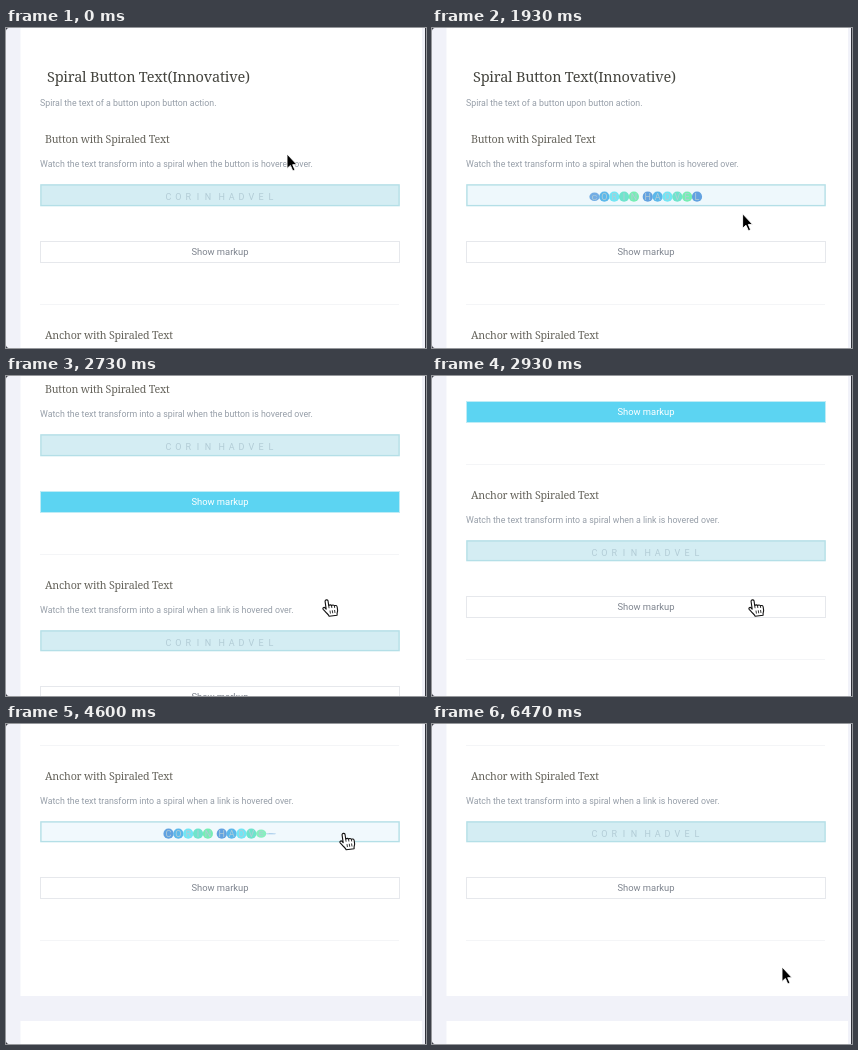
These frames come from a looping animation (420x320 px, 6540 ms). An HTML page:

```html
<!DOCTYPE html>
<html lang="en">
<head>
<meta charset="utf-8">
<title>Spiral button text</title>
<style>
  html, body { margin: 0; width: 100%; height: 100%; overflow: hidden; background: #30323b; }
  svg { display: block; width: 420px; height: 320px; }
  .title, .heading { font-family: "Noto Serif", serif; font-weight: 300; }
  .title { font-size: 14.5px; letter-spacing: -.21px; fill: #45453f; }
  .heading { font-size: 10.7px; letter-spacing: -.21px; fill: #66645c; }
  .note { font: 400 8.8px Roboto, sans-serif; fill: #969ea8; }
  .label { font: 400 9.4px Roboto, sans-serif; text-anchor: middle; }
  .letter { font: 400 9px Roboto, sans-serif; text-anchor: middle; fill: #b2ccd6; }
</style>
</head>
<body>
<svg viewBox="0 0 420 320">
  <rect width="419" height="320" fill="#f1f2f9"/>
  <g id="page">
    <path d="M14.5-10H416V527H14.5ZM14.5 552H416V700H14.5Z" fill="#fff"/>
    <path d="M34 276.5H393M34 471.5H393" stroke="#f4f5f7"/>
    <text class="title" x="41" y="54">Spiral Button Text(Innovative)</text>
    <text class="note" x="34" y="78">Spiral the text of a button upon button action.</text>
    <text class="heading" x="39" y="115">Button with Spiraled Text</text>
    <text class="note" x="34" y="139">Watch the text transform into a spiral when the button is hovered over.</text>
    <text class="heading" x="39" y="311">Anchor with Spiraled Text</text>
    <text class="note" x="34" y="335">Watch the text transform into a spiral when a link is hovered over.</text>
  </g>
  <path d="M0 0H2.5Q.4.4 0 2.5ZM0 320H2.5Q.4 319.6 0 317.5Z" fill="#30323b"/>
  <path id="arrow" d="M0 0V14.5L3.4 11.5L5.8 17L8 16L5.7 10.7H10Z" fill="#000" stroke="#fff" stroke-width=".9"/>
  <g id="hand"><g transform="rotate(-8)" stroke="#111" stroke-width="1.1" stroke-linejoin="round">
    <path fill="#fff" d="M-1.6 9V1.2C-1.6-.6 1.4-.6 1.4 1.2V6C1.8 5 4 5 4.2 6.4C5 5.4 6.8 5.8 7 7C8 6.2 9.6 7 9.6 8.4V11.5C9.6 13 8.4 14 8.4 16.5H.4C.2 14.8-1.6 13.4-3 11L-4.6 8.8C-5.4 7.4-3.4 6.4-2.6 7.6Z"/>
    <path fill="none" stroke-width=".8" d="M1.4 6V8.5M4.2 6.4V8.7M7 7V9M2 11V14M4.3 11V14M6.6 11V14"/>
  </g></g>
</svg>
<script>
const LOOP = 6540, NAME = "CORIN HADVEL", SCROLL = 255;
const PALETTE = ["#62a2e0", "#5cb8ea", "#72e6f4", "#6fe4cc", "#76eeb4"];
const page = document.getElementById("page");

const clamp = v => Math.min(1, Math.max(0, v));
const ramp = (t, start, duration) => clamp((t - start) / duration);
const smooth = u => u * u * (3 - 2 * u);
const mix = (a, b, u) => `rgb(${a.map((v, i) => Math.round(v + (b[i] - v) * u))})`;

function add(parent, tag, attrs, text = "") {
  const node = document.createElementNS("http://www.w3.org/2000/svg", tag);
  for (const key in attrs) node.setAttribute(key, attrs[key]);
  node.textContent = text;
  return parent.appendChild(node);
}

function spiralButton(y, height, enter, leave) {
  const box = add(page, "rect", { x: 34.9, y: y + .9, width: 358.2, height: height - 1.8, stroke: "#b4dfe7", "stroke-width": 1.4 });
  const letters = NAME.split(" ").flatMap((word, w) => [...word].map((char, i) => {
    const index = w * 5 + i;
    const x = 162.5 + 9.85 * index + 4 * w;
    const group = add(page, "g", {});
    const disc = add(group, "circle", { r: 5.1, fill: PALETTE[i % 5] });
    add(group, "text", { class: "letter", y: 3.3 }, char);
    return { index, x, group, disc };
  }));
  return t => {
    const hover = ramp(t, enter, 400) - ramp(t, leave, 400);
    box.setAttribute("fill", mix([212, 237, 243], [241, 249, 253], hover));
    for (const { index, x, group, disc } of letters) {
      const arrive = ramp(t, enter + index * 50, 240);
      const depart = ramp(t, leave + index * 48, 160);
      const flip = Math.max(.1, Math.abs(Math.cos(Math.PI * (smooth(arrive) - smooth(depart)))));
      group.setAttribute("transform", `translate(${x} ${y + 12.7}) scale(1 ${flip})`);
      disc.setAttribute("opacity", clamp((arrive - depart) * 1.2));
    }
  };
}

function markupButton(y, enter) {
  const box = add(page, "rect", { x: 34.5, y: y + .5, width: 359, height: 21 });
  const label = add(page, "text", { class: "label", x: 214, y: y + 14.2 }, "Show markup");
  return t => {
    const hover = ramp(t, enter, 320);
    box.setAttribute("fill", mix([255, 255, 255], [92, 212, 242], hover));
    box.setAttribute("stroke", mix([230, 232, 236], [190, 236, 246], hover));
    label.setAttribute("fill", mix([126, 132, 142], [255, 255, 255], clamp(hover * 1.2)));
  };
}

const parts = [
  spiralButton(156, 22.5, 430, 1888), markupButton(213, 2160),
  spiralButton(352, 21.5, 3980, 5640), markupButton(408, Infinity)
];

// Pointer moves: start, duration, x, y
const START = [281, 126];
const MOVES = [
  [70, 530, 305.5, 166], [1735, 500, 320.5, 224], [3650, 380, 337.5, 109.5],
  [5270, 370, 345, 118], [5640, 260, 357, 218], [5900, 330, 350, 243]
];
const HAND_TIMES = [[430, 1888], [2080, 3690], [3960, 5640]];

function drawPointer(t) {
  let [x, y] = START;
  for (const [start, duration, toX, toY] of MOVES) {
    const u = smooth(ramp(t, start, duration));
    x += (toX - x) * u;
    y += (toY - y) * u;
  }
  const isHand = HAND_TIMES.some(([from, to]) => t >= from && t < to);
  for (const id of ["hand", "arrow"]) {
    const node = document.getElementById(id);
    node.setAttribute("transform", `translate(${x} ${y})`);
    node.setAttribute("visibility", (id === "hand") === isHand ? "visible" : "hidden");
  }
}

function draw(now) {
  const t = now % LOOP;
  parts.forEach(update => update(t));
  const scroll = SCROLL * ramp(t, 2470, 600) ** 1.15;
  page.setAttribute("transform", `translate(0 ${-Math.round(scroll)})`);
  drawPointer(t);
}

const began = performance.now();
function tick() {
  draw(performance.now() - began);
  requestAnimationFrame(tick);
}
tick();
</script>
</body>
</html>
```
